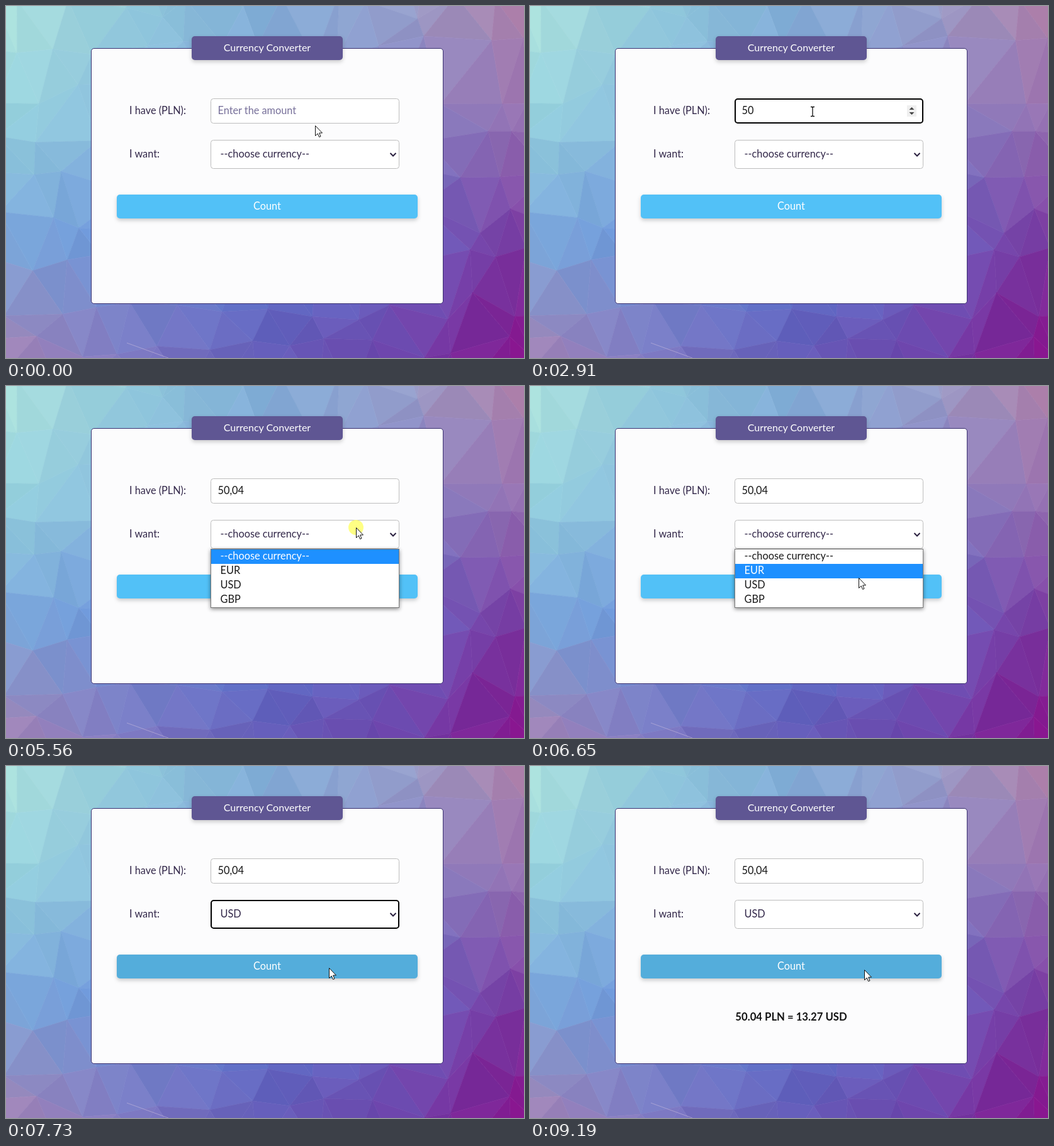
An HTML page that plays this animation: 823x560 px, repeating every 9260 ms.

```html
<!DOCTYPE html>
<html lang="en">
<head>
<meta charset="utf-8">
<title>Currency Converter</title>
<style>
html, body { margin: 0; width: 100%; height: 100%; overflow: hidden; }
svg { display: block; width: 823px; height: 560px; font: 16.3px Lato, "Open Sans", sans-serif; fill: #33284a; }
.box { fill: #fff; stroke: #bdbdbd; }
.drop { filter: drop-shadow(0 3px 3px #0003); }
.mid { text-anchor: middle; fill: #fff; }
</style>
</head>
<body>
<svg viewBox="0 0 823 560">
  <g id="mesh"></g>
  <path d="M192 536 258 560" stroke="#d4c4e0" stroke-opacity=".5"/>
  <rect x="135.5" y="67.5" width="559" height="406" rx="4.5" fill="#fcfcfd" stroke="#3a3070"/>
  <rect class="drop" x="295" y="48" width="240" height="38" rx="5" fill="#5f5693"/>
  <text class="mid" x="415" y="72" font-size="16">Currency Converter</text>
  <text x="196" y="172">I have (PLN):</text>
  <text x="196" y="241">I want:</text>
  <rect id="input" class="box" rx="4"/>
  <text id="amount" x="336.5" y="172"></text>
  <path id="caret" stroke="#000" d="M0 158V176"/>
  <g id="spinner">
    <path fill="#efefef" d="M599 158h15v18h-15z"/>
    <path id="up" fill="#c6c6c6" d="M599 158h15v9h-15z"/>
    <path fill="#444" d="M602.5 165 606.5 161 610.5 165zM602.5 169 606.5 173 610.5 169z"/>
  </g>
  <rect id="select" class="box" rx="4"/>
  <text id="choice" x="340.5" y="241"></text>
  <path d="M610.5 234 615 238.5 619.5 234" fill="none" stroke="#2b2140" stroke-width="2"/>
  <rect id="button" class="drop" x="176" y="300" width="478" height="38" rx="5"/>
  <text class="mid" x="415" y="324">Count</text>
  <text id="result" x="415" y="405" text-anchor="middle" font-weight="700" font-size="16.7" fill="#111">50.04 PLN = 13.27 USD</text>
  <g id="list">
    <rect x="325.5" y="259.5" width="299" height="93" fill="#fff" stroke="#777" style="filter:drop-shadow(0 2px 3px #0007)"/>
    <rect id="mark" x="326" width="298" height="23" fill="#1e90ff"/>
  </g>
  <circle id="click" r="12" fill="#ffff6e" fill-opacity=".85"/>
  <path id="arrow" fill="#fff" stroke="#111" d="M.5.5V16.5L4.2 13 6.6 18.5 9 17.5 6.7 12H11.5Z"/>
  <path id="beam" fill="none" stroke="#111" stroke-width="1.3" d="M-3-7.5H-1L0-6.5 1-7.5H3M0-6.5V6.5M-3 7.5H-1L0 6.5 1 7.5H3"/>
</svg>
<script>
const W = 823, H = 560, LOOP = 9260;
const $ = id => document.getElementById(id);
const set = (el, attrs) => { for (const k in attrs) el.setAttribute(k, attrs[k]); return el; };
const add = (parent, tag, attrs) =>
  parent.appendChild(set(document.createElementNS('http://www.w3.org/2000/svg', tag), attrs));
const show = (id, on) => set($(id), { visibility: on ? 'visible' : 'hidden' });
const within = (t, a, b) => t >= a && t < b;
const clamp = (v, lo, hi) => Math.max(lo, Math.min(hi, v));
const lerp = (a, b, f) => a + (b - a) * f;
const blend = (p, q, f) => p.map((v, i) => lerp(v, q[i], f));

// Low-poly backdrop: a jittered grid tinted from a coarse colour field
const field = [
  '#b0e5df #92cbde #82b0d9 #95a0cc #ad7da6',
  '#94d0de #88b8dc #84a0d4 #8280c4 #9470b2',
  '#7aa6da #6c94da #5a74cc #6860be #7a3aa2',
  '#a084b8 #7c78c2 #645eba #6c46ac #86108a'
].map(row => row.split(' ').map(hex => [1, 3, 5].map(i => parseInt(hex.slice(i, i + 2), 16))));

let seed = 7;
const rand = () => (seed = seed * 16807 % 2147483647) / 2147483647;

function tint(x, y) {
  const u = clamp(x / W, 0, 1) * 4, v = clamp(y / H, 0, 1) * 3;
  const i = Math.min(3, Math.floor(u)), j = Math.min(2, Math.floor(v));
  const row = r => blend(field[r][i], field[r][i + 1], u - i);
  const shade = (rand() - .5) * 9;
  return `rgb(${blend(row(j), row(j + 1), v - j).map(c => Math.round(c + shade))})`;
}

function drawMesh(step) {
  const jitter = () => (rand() - .5) * step * .7;
  const cols = Math.ceil(W / step) + 3, rows = Math.ceil(H / step) + 3;
  const grid = Array.from({ length: rows }, (_, r) => Array.from({ length: cols }, (_, c) =>
    [(c - 1 + r % 2 / 2) * step + jitter(), (r - 1) * step + jitter()]));
  const triangle = (...pts) => {
    const [x, y] = [0, 1].map(k => pts.reduce((sum, p) => sum + p[k], 0) / 3);
    const fill = tint(x, y);
    add($('mesh'), 'polygon', { points: pts.join(' '), fill, stroke: fill, 'stroke-width': .6 });
  };
  for (let r = 1; r < rows; r++) for (let c = 1; c < cols; c++) {
    const [a, b, d, e] = [grid[r - 1][c - 1], grid[r - 1][c], grid[r][c - 1], grid[r][c]];
    if (r % 2) { triangle(a, b, d); triangle(b, e, d); }
    else { triangle(a, b, e); triangle(a, e, d); }
  }
}
drawMesh(68);

const NONE = '--choose currency--';
const options = [NONE, 'EUR', 'USD', 'GBP'].map((name, i) => {
  const el = add($('list'), 'text', { x: 340.5, y: 276 + 23 * i });
  el.textContent = name;
  return el;
});

// Pointer moves: start time, end time, destination
const moves = [
  [50, 250, 448, 168], [850, 1060, 448, 187], [1060, 1390, 448, 168], [2910, 3180, 634, 167],
  [3380, 3650, 607, 164], [5030, 5290, 556, 225], [6090, 6850, 510, 333], [6850, 7060, 513, 321],
  [8720, 8790, 515, 321], [9120, 9190, 531, 324]];
const FOCUS = 1060, KEY = 2250, KEY2 = 2380, OPEN = 5560, PICK = 7260, COUNT = 8260;
const HOLD = 100, BLINK = 530;
const bumps = [3850, 4230, 4450, 4660];
const clicks = [FOCUS, ...bumps, OPEN, PICK, COUNT];

const pointer = t => moves.reduce((pos, [start, end, ...to]) =>
  blend(pos, to, clamp((t - start) / (end - start), 0, 1)), [491, 190]);

function amountAt(t) {
  if (t < KEY) return 'Enter the amount';
  if (t < KEY2) return '5';
  const cents = bumps.filter(b => b <= t).length;
  return cents ? '50,0' + cents : '50';
}

function frameBox(id, y, h, focus) {
  const inset = focus ? 1 : .5;
  set($(id), { x: 325 + inset, y: y + inset, width: 300 - 2 * inset, height: h - 2 * inset });
  $(id).style.cssText = focus ? 'stroke:#000;stroke-width:2' : '';
}

function draw(t) {
  const [x, y] = pointer(t).map(Math.round);
  const over = within(x, 326, 625) && within(y, 148, 188);
  const inputFocus = within(t, FOCUS, OPEN);
  for (const id of ['arrow', 'beam', 'click']) set($(id), { transform: `translate(${x} ${y})` });
  show('beam', over && x < 598);
  show('arrow', !(over && x < 598));
  show('click', clicks.some(c => within(t, c, c + (c === OPEN ? BLINK : HOLD))));

  const amount = $('amount');
  amount.textContent = amountAt(t);
  set(amount, { fill: t < KEY ? '#77709a' : '#161616' });
  const width = t < KEY ? 0 : amount.getComputedTextLength();
  set($('caret'), { transform: `translate(${Math.round(336 + width) + .5} 0)` });
  const lastEdit = [FOCUS, KEY2, ...bumps.map(b => b + HOLD)].filter(e => e <= t).pop();
  show('caret', inputFocus && Math.floor((t - lastEdit) / BLINK) % 2 === 0);
  show('spinner', over || inputFocus);
  show('up', over && within(x, 599, 615) && y < 167);
  frameBox('input', 147, 40, inputFocus);

  const picked = t >= PICK + HOLD;
  $('choice').textContent = picked ? 'USD' : NONE;
  frameBox('select', 213, 46, picked && t < COUNT);
  $('list').style.display = t >= OPEN && !picked ? '' : 'none';
  const row = clamp(Math.floor((y - 260) / 23), 0, 3);
  set($('mark'), { y: 260 + 23 * row });
  options.forEach((el, i) => set(el, { fill: i === row ? '#fff' : '#1a1a1a' }));

  const hover = clamp((t - PICK - HOLD) / 300, 0, 1);
  set($('button'), { fill: `rgb(${blend([82, 193, 247], [84, 173, 219], hover).map(Math.round)})` });
  show('result', t >= COUNT + 80);
}

function tick() {
  draw(performance.now() % LOOP);
  requestAnimationFrame(tick);
}
tick();
</script>
</body>
</html>
```
